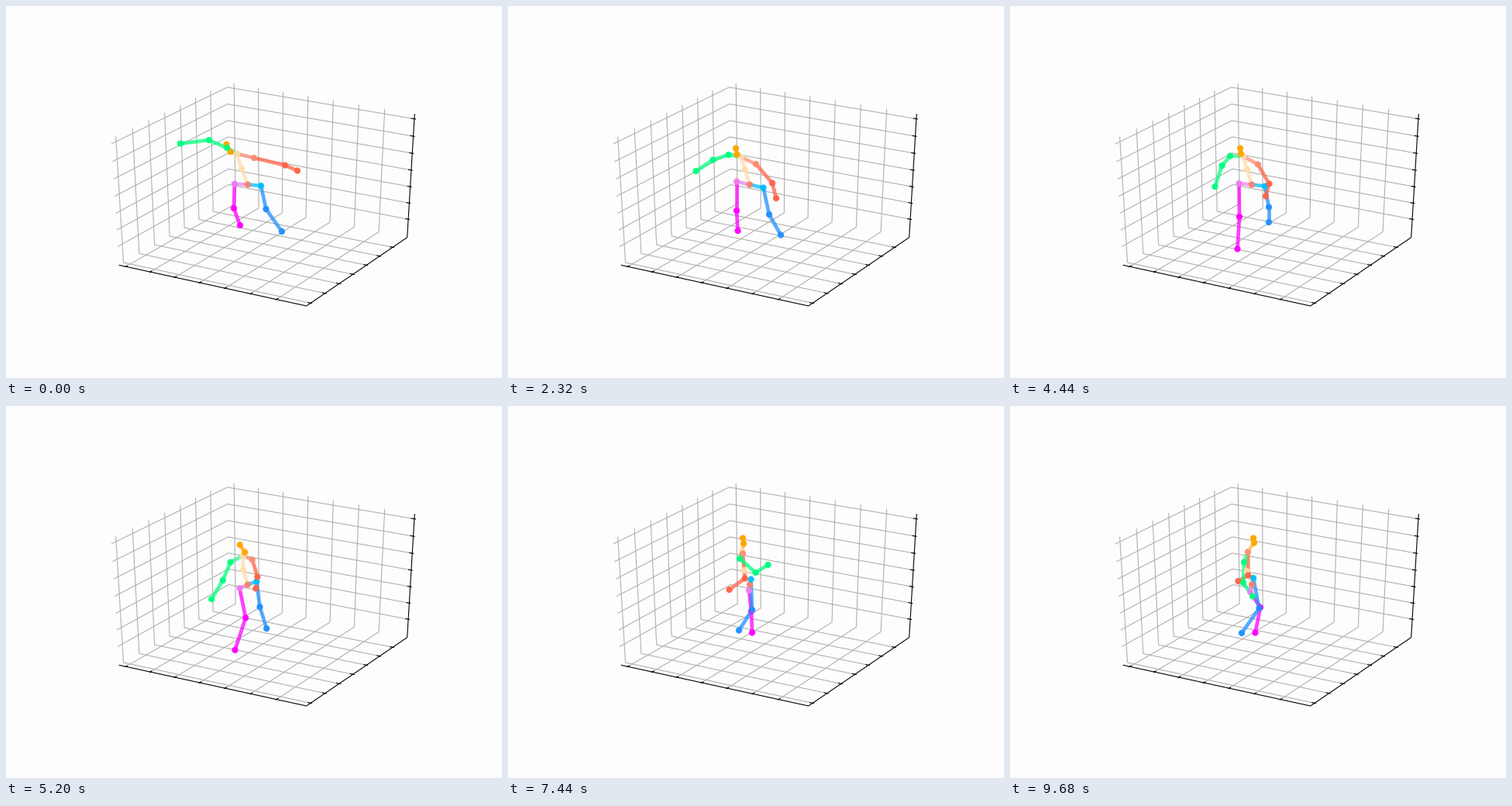
A matplotlib script for the animation above (9.72 s loop, 640 px wide and 480 px high).

```python
import numpy as np
import matplotlib.pyplot as plt
from matplotlib.animation import FuncAnimation
from matplotlib.collections import LineCollection

W, H = 640, 480
FRAMES, INTERVAL = 243, 40
KEYS = [0, 23, 58, 111, 148, 186, 242]

fig = plt.figure(figsize=(W / 100, H / 100), dpi=100, facecolor="#fdfdfd")
ax = fig.add_axes([0, 0, 1, 1])
ax.set_xlim(0, W)
ax.set_ylim(H, 0)
ax.axis("off")

# ---- perspective box -------------------------------------------------
AZIM, ELEV, DIST = np.radians(-60), np.radians(30), 10
RIGHT = np.array([-np.sin(AZIM), np.cos(AZIM), 0])
TOWARD = np.array([np.cos(ELEV) * np.cos(AZIM),
                   np.cos(ELEV) * np.sin(AZIM), np.sin(ELEV)])
UP = np.cross(TOWARD, RIGHT)
E = 25 / 48  # half the edge of the box


def project(*points):
    p = np.array(points, float)
    depth = DIST - p @ TOWARD
    return np.column_stack([334.7 + 2681 * (p @ RIGHT) / depth,
                            237.7 - 1785 * (p @ UP) / depth])


grid, edges = [], []
for k in range(7):
    a = -0.481 + 0.1403 * k
    c = 0.481 - 0.1403 * k
    grid += [project((a, -E, -E), (a, E, -E), (a, E, E)),
             project((E, a, -E), (-E, a, -E), (-E, a, E)),
             project((-E, -E, c), (-E, E, c), (E, E, c))]
    near, far = E - 1 / 60, E + 1 / 120
    edges += [project((a, -near, -E), (a, -far, -E)),
              project((near, a, -E), (far, a, -E)),
              project((near, E, c), (far, E, c))]
edges += [project((-E, -E, -E), (E, -E, -E)),
          project((E, -E, -E), (E, E, -E)),
          project((E, E, -E), (E, E, E))]
ax.add_collection(LineCollection(grid, colors="#b0b0b0", linewidths=0.8, zorder=1))
ax.add_collection(LineCollection(edges, colors="black", linewidths=0.8, zorder=2))


# ---- skeleton --------------------------------------------------------
def ease_through(keys, values):
    """Smooth curve through the keys without overshoot, one value per frame."""
    t, v = np.array(keys, float), np.array(values, float)
    h = np.diff(t)
    d = np.diff(v) / h
    m = np.zeros_like(v)
    m[0], m[-1] = d[0], d[-1]
    for i in range(1, len(v) - 1):
        if d[i - 1] * d[i] > 0:
            w1, w2 = 2 * h[i] + h[i - 1], h[i] + 2 * h[i - 1]
            m[i] = (w1 + w2) / (w1 / d[i - 1] + w2 / d[i])
    f = np.arange(FRAMES)
    i = np.clip(np.searchsorted(t, f, side="right") - 1, 0, len(h) - 1)
    s = (f - t[i]) / h[i]
    return ((1 + 2 * s) * (1 - s) ** 2 * v[i] + s * (1 - s) ** 2 * h[i] * m[i]
            + s * s * (3 - 2 * s) * v[i + 1] + s * s * (s - 1) * h[i] * m[i + 1])


paths, bones, dot_colors, bone_colors = {}, [], [], []


def joint(name, parent, dot, bone, xs, ys, extra=None):
    keyed = {k: (x, y) for k, x, y in zip(KEYS, xs, ys)}
    keyed.update(extra or {})
    keys = sorted(keyed)
    x, y = zip(*(keyed[k] for k in keys))
    paths[name] = np.column_stack([ease_through(keys, x), ease_through(keys, y)])
    dot_colors.append(dot)
    if parent:
        bones.append((parent, name))
        bone_colors.append(bone)


MAGENTA, VIOLET = "#ff00ff", "#ee82ee"
BLUE, SKY = "#1e90ff", "#00bfff"
PEACH, ORANGE = "#ffdead", "#ffa500"
TOMATO, SALMON = "#ff6347", "#fa8f76"
GREEN = "#00ff7f"

joint("pelvis", None, "#f4806c", None, [312] * 7, [230.5] * 7)

joint("r_hip", "pelvis", VIOLET, VIOLET,
      [295, 289, 295, 295.5, 308, 311, 310],
      [229.5, 228.5, 226.5, 229, 240, 238, 240])
joint("r_knee", "r_hip", MAGENTA, MAGENTA,
      [294, 294, 295, 296, 321, 314, 323],
      [261, 263.5, 264, 272, 274, 264.5, 260])
joint("r_ankle", "r_knee", MAGENTA, MAGENTA,
      [302, 297, 296.5, 293.5, 305.5, 315, 316.5],
      [283, 284, 290, 313.5, 309, 292.5, 292.5],
      {99: (295, 295), 119: (292, 316.5), 212: (319, 288)})

joint("l_hip", "pelvis", SKY, SKY,
      [329, 336, 329.5, 329, 317, 313.5, 314],
      [232, 233.5, 234.5, 232.5, 221.5, 223.5, 222])
joint("l_knee", "l_hip", BLUE, BLUE,
      [335.5, 345.5, 337, 334, 320.5, 315, 321.5],
      [262, 268, 269, 259.5, 259, 263, 261])
joint("l_ankle", "l_knee", BLUE, BLUE,
      [356, 367, 352, 334, 294.5, 298, 299],
      [291, 294.5, 295.5, 279, 298.5, 289.5, 293],
      {51: (360, 295.5), 76: (339, 291), 125: (342, 284), 212: (296, 288)})

joint("spine", "pelvis", PEACH, PEACH,
      [304, 303, 305.5, 306, 306, 304.5, 305.5],
      [210, 209, 211, 211, 212, 212, 213])
joint("neck", "spine", PEACH, PEACH,
      [298, 299.5, 301, 301, 310, 302, 307],
      [190.5, 187, 195, 194, 192, 188, 187.5])
joint("nose", "neck", ORANGE, "#ffb84d",
      [289.5, 294, 295.5, 298, 317, 304, 315],
      [188, 184.5, 191.5, 190.5, 186, 177.5, 176.5],
      {12: (291, 178)})
joint("head", "nose", ORANGE, ORANGE,
      [284.5, 294, 294, 297, 312, 303, 314],
      [178.5, 174.5, 183.5, 183.5, 179.5, 170.5, 170.5],
      {12: (289, 166), 126: (300, 179), 215: (308, 168.5)})

joint("l_shoulder", "neck", SALMON, SALMON,
      [320, 323, 320, 320, 314, 303, 307],
      [196, 193.5, 204, 204.5, 192, 190.5, 188.5])
joint("l_elbow", "l_shoulder", TOMATO, TOMATO,
      [360, 351, 341, 334.5, 314, 305.5, 307.5],
      [205.5, 214.5, 228.5, 229.5, 212, 222.5, 218.5])
joint("l_wrist", "l_elbow", TOMATO, TOMATO,
      [376, 354, 346, 330, 312, 285.5, 294.5],
      [212.5, 235, 248, 245.5, 228, 237, 226],
      {76: (336, 250), 203: (273.5, 232)})

joint("r_shoulder", "neck", GREEN, "#33f58c",
      [285, 278.5, 284.5, 284, 296, 299, 302],
      [183, 183.5, 192, 193.5, 208.5, 197, 201.5])
joint("r_elbow", "r_shoulder", GREEN, GREEN,
      [262, 250, 264.5, 273.5, 288.5, 319.5, 301],
      [173, 176, 198.5, 206, 240, 215, 228])
joint("r_wrist", "r_elbow", GREEN, GREEN,
      [225, 222, 242.5, 264.5, 295, 335.5, 313],
      [177.5, 176.5, 213, 233, 274, 205, 245.5],
      {51: (228, 200), 76: (268, 225), 98: (269, 230),
       120: (257, 236), 172: (322, 232), 201: (326, 212)})

track = np.stack(list(paths.values()), axis=1)
names = list(paths)
links = np.array([[names.index(a), names.index(b)] for a, b in bones])

limbs = LineCollection(track[0][links], colors=bone_colors, linewidths=3.4,
                       alpha=0.75, capstyle="projecting", zorder=3)
ax.add_collection(limbs)
dots = ax.scatter(*track[0].T, s=36, c=dot_colors, linewidths=0, alpha=0.92, zorder=4)


def draw(frame):
    pose = track[frame]
    limbs.set_segments(pose[links])
    dots.set_offsets(pose)
    return limbs, dots


anim = FuncAnimation(fig, draw, frames=FRAMES, interval=INTERVAL,
                     repeat=True, repeat_delay=0, blit=False)
plt.show()
```
